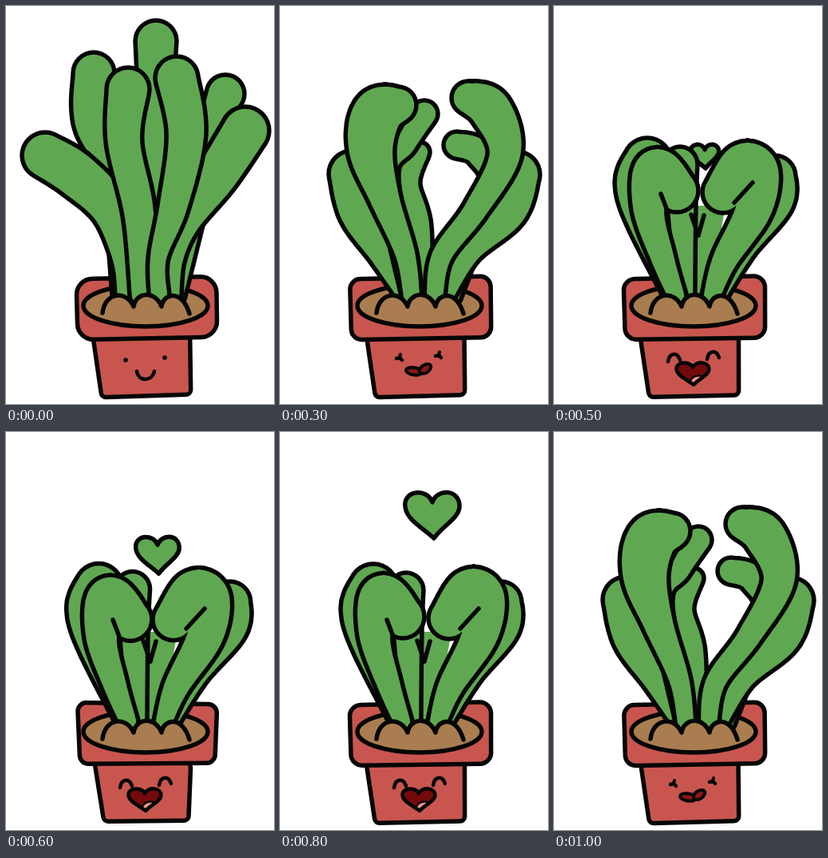
Animation of 336 by 498 pixels, one loop 1.1 s. Source, as an HTML page with a canvas:

```html
<!DOCTYPE html>
<html lang="en">
<head>
<meta charset="utf-8">
<title>Happy plant</title>
<style>
html, body { margin: 0; width: 100%; height: 100%; overflow: hidden; background: #fff; }
canvas { display: block; }
</style>
</head>
<body>
<canvas id="stage" width="336" height="498"></canvas>
<script>
const ctx = document.getElementById('stage').getContext('2d');
const GREEN = '#5fa851', CLAY = '#c8564f', SOIL = '#a97d50', INK = '#060606';
const STEP = 100, LINE = 5.5, ROOT_Y = 362, ROOT_R = 13;

// A leaf is a root x, then x, y, radius along its spine up to the tip.
const spread = {
  seed: 0, round: 20, look: 'dot', smile: 10,
  leaves: [
    [182, 186, 240, 14, 187, 150, 20, 188, 44, 26],
    [212, 240, 220, 20, 258, 150, 18, 275, 110, 24],
    [146, 138, 218, 20, 111, 145, 27, 110, 84, 26],
    [150, 150, 315, 19, 131, 254, 26, 88, 211, 30, 49, 187, 29],
    [207, 207, 315, 18, 222, 268, 24, 264, 212, 28, 300, 156, 30],
    [168, 167, 262, 21, 148, 170, 23, 153, 104, 27],
    [192, 191, 315, 13, 210, 250, 20, 226, 160, 25, 214, 90, 27]
  ]
};

const curl = {
  seed: 2, round: 13, look: 'squint',
  leaves: [
    [158, 130, 310, 20, 100, 258, 27, 90, 210, 29],
    [178, 172, 275, 18, 158, 222, 18, 175, 183, 13],
    [165, 135, 215, 14, 158, 172, 15, 181, 135, 17],
    [165, 157, 310, 15, 131, 240, 21, 114, 180, 30, 122, 135, 33, 148, 124, 23],
    [215, 262, 235, 12, 250, 185, 18, 222, 174, 17],
    [207, 235, 305, 20, 283, 255, 28, 297, 211, 29],
    [194, 203, 312, 15, 245, 255, 17, 282, 185, 22, 264, 130, 28, 236, 115, 21]
  ]
};

const hug = {
  seed: 3, round: 9, look: 'arc', mouth: .85,
  leaves: [
    [155, 128, 283, 18, 99, 250, 27, 92, 213, 28],
    [150, 110, 230, 20, 125, 185, 24, 157, 172, 24],
    [205, 225, 300, 15, 270, 250, 26, 286, 197, 29, 258, 160, 30, 220, 162, 23],
    [176, 168, 290, 15, 150, 235, 16],
    [190, 200, 290, 14, 224, 240, 14],
    [167, 157, 318, 15, 126, 258, 21, 109, 212, 28, 134, 192, 30, 160, 205, 28],
    [199, 209, 315, 18, 248, 245, 24, 260, 200, 30, 230, 191, 29, 192, 198, 27]
  ],
  lines: [[124, 218, 142, 231], [253, 208, 228, 224]]
};

const kiss = {
  seed: 4, round: 14, look: 'arc', mouth: 1, filled: true,
  leaves: [
    [150, 112, 268, 22, 106, 222, 30, 117, 195, 30],
    [164, 160, 250, 18, 158, 198, 22],
    [205, 240, 305, 14, 275, 245, 26, 277, 213, 26],
    [153, 136, 315, 17, 119, 255, 22, 128, 207, 30, 154, 231, 27],
    [198, 214, 318, 18, 250, 255, 25, 254, 208, 30, 235, 199, 28, 212, 233, 26]
  ],
  lines: [[134, 235, 142, 256], [249, 221, 226, 246], [172, 261, 181, 287], [188, 262, 181, 287]]
};

// Shift each leaf, most at the tip, by its own dx, dy.
function lean(pose, shifts, k, look) {
  const leaves = pose.leaves.map((leaf, n) => leaf.map((v, i) => {
    const axis = (i - 1) % 3;
    return i === 0 || axis === 2 ? v : v + k * shifts[n][axis] * i / leaf.length;
  }));
  return { ...pose, ...look, leaves };
}

const swing = [[4, 8], [-1, 0], [-2, 3], [6, 10], [2, 2], [2, 8], [2, 8]];
const nudge = [[-2, -1], [2, -4], [11, 0], [5, 8], [-5, 4]];
const sway = lean(spread, swing, 1, { seed: 1, round: 11, smile: 14 });
const swaying = lean(spread, swing, .5, { seed: 5, round: 15, smile: 12 });
const glow = lean(kiss, nudge, 1, { seed: 6, round: 8 });
const glowing = lean(kiss, nudge, .5, { seed: 7, round: 11 });

const spline = (a, b, c, d, t) =>
  b + t / 2 * (c - a + t * (2 * a - 5 * b + 4 * c - d + t * (3 * (b - c) + d - a)));

function spine([root, ...rest]) {
  const pts = [[root, ROOT_Y, ROOT_R]], out = [];
  for (let i = 0; i < rest.length; i += 3) pts.push(rest.slice(i, i + 3));
  const last = pts.length - 1, at = i => pts[Math.max(0, Math.min(last, i))];
  for (let i = 0; i < last; i++)
    for (let t = 0; t <= 1; t += 1 / 32)
      out.push([0, 1, 2].map(k => spline(at(i - 1)[k], at(i)[k], at(i + 1)[k], at(i + 2)[k], t)));
  return out;
}

function drawLeaf(leaf) {
  const dots = spine(leaf);
  for (const [color, grow] of [[INK, LINE / 2], [GREEN, -LINE / 2]]) {
    ctx.fillStyle = color;
    ctx.beginPath();
    for (const [x, y, r] of dots) {
      ctx.moveTo(x + r + grow, y);
      ctx.arc(x, y, r + grow, 0, 2 * Math.PI);
    }
    ctx.fill();
  }
}

function paint(path, fill, width = LINE) {
  if (fill) { ctx.fillStyle = fill; ctx.fill(path); }
  if (width) { ctx.lineWidth = width; ctx.stroke(path); }
}

function poly(p) {
  const path = new Path2D();
  for (let i = 0; i < p.length; i += 2) path.lineTo(p[i], p[i + 1]);
  return path;
}

function oval(x, y, rx, ry, turn = 0) {
  const path = new Path2D();
  path.ellipse(x, y, rx, ry, turn, 0, 2 * Math.PI);
  return path;
}

// Four-cornered box with rounded corners and a hand-drawn wobble.
function box(p, r, seed) {
  const q = p.map((v, i) => v + 1.8 * Math.sin(i * 2 + seed * 3)), path = new Path2D();
  path.moveTo((q[0] + q[2]) / 2, (q[1] + q[3]) / 2);
  for (let i = 2; i <= 8; i += 2)
    path.arcTo(q[i % 8], q[(i + 1) % 8], q[(i + 2) % 8], q[(i + 3) % 8], r);
  path.closePath();
  return path;
}

function heartPath(x, y, sx, sy = sx) {
  const shape = new Path2D('M0-16C-6-34-37-32-34-10C-32 6-12 16 2 29C12 14 33 4 34-10C35-33 6-34 0-16Z');
  const path = new Path2D();
  path.addPath(shape, new DOMMatrix([sx, 0, 0, sy, x, y]));
  return path;
}

function drawPot({ seed, round }) {
  paint(box([109, 412, 232, 412, 230, 487, 121, 488], 6, seed), CLAY);
  paint(box([88, 340, 265, 339, 263, 415, 91, 416], round, seed), CLAY);
  paint(oval(175, 375, 78, 26), SOIL);
}

function drawBumps() {
  const path = new Path2D();
  let x = 121, y = 384;
  path.moveTo(x, y);
  for (const end of [160, 195, 230]) {
    const w = end - x, endY = end === 230 ? 385 : 376;
    path.bezierCurveTo(x + w * .08, 358, end - w * .25, 355, end, endY);
    x = end;
  }
  paint(path, SOIL);
}

function drawEye(x, y, look) {
  if (look === 'dot') paint(oval(x, y + 3, 2.8, 2.8), INK, 0);
  else if (look === 'arc') {
    const arc = new Path2D();
    arc.moveTo(x - 7, y + 5);
    arc.bezierCurveTo(x - 5, y - 7, x + 5, y - 7, x + 8, y + 3);
    paint(arc, null, 4.5);
  } else {
    paint(poly([x - 4, y + 1, x, y, x + 3, y + 3]), null, 4.5);
    paint(poly([x, y, x + 1, y - 4]), null, 4);
  }
}

function drawMouth({ smile, mouth: s }) {
  const x = 174, y = 457;
  if (smile) {
    const arc = new Path2D();
    arc.moveTo(x - 10, y);
    arc.bezierCurveTo(x - 8, y + smile * 1.33, x + 9, y + smile * 1.33, x + 12, y);
    paint(arc, null, 4.5);
  } else if (!s) {
    paint(oval(x - 6, y, 10, 4.5, .15), '#8d1712', 4);
    paint(oval(x + 8, y - 3, 8, 5, -.6), '#8d1712', 4);
  } else {
    const lips = heartPath(x, y + 3, .6 * s, .48 * s);
    paint(lips, '#74090c', 0);
    ctx.save();
    ctx.clip(lips);
    paint(oval(x + 5 * s, y + 12 * s, 9 * s, 6 * s, -.4), '#ee9187', 2.5);
    ctx.restore();
    paint(lips, null, 4.5);
  }
}

function draw({ pose, heart }) {
  ctx.fillStyle = '#fff';
  ctx.fillRect(0, 0, 336, 498);
  ctx.strokeStyle = INK;
  ctx.lineCap = ctx.lineJoin = 'round';
  drawPot(pose);
  if (heart) paint(heartPath(...heart), GREEN);
  if (pose.filled) paint(poly([150, 250, 215, 250, 195, 360, 165, 360]), GREEN, 0);
  pose.leaves.forEach(drawLeaf);
  for (const line of pose.lines || []) paint(poly(line));
  drawBumps();
  drawEye(150, 440, pose.look);
  drawEye(199, 437, pose.look);
  drawMouth(pose);
}

const steps = [
  { pose: spread }, { pose: swaying }, { pose: sway },
  { pose: curl }, { pose: hug },
  { pose: kiss, heart: [189, 188, .52] },
  { pose: glowing, heart: [190, 154, .8] },
  { pose: glow, heart: [191, 129, 1] },
  { pose: kiss, heart: [191, 104, 1] },
  { pose: hug }, { pose: curl }
];

function tick() {
  draw(steps[Math.floor(performance.now() / STEP) % steps.length]);
  requestAnimationFrame(tick);
}
tick();
</script>
</body>
</html>
```
